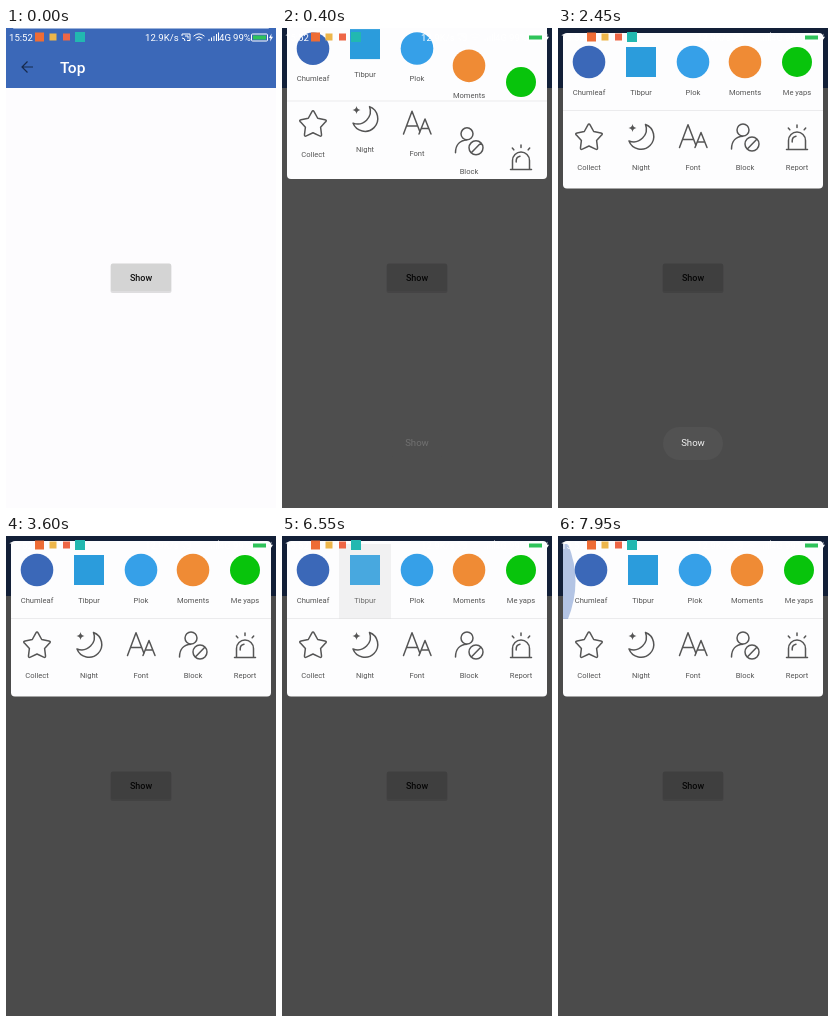
Write an HTML page that moves like this. It is 270 by 480 pixels and loops after 8000 ms.

```html
<!DOCTYPE html>
<html lang="en">
<head>
<meta charset="utf-8">
<style>
  html, body { margin: 0; width: 100%; height: 100%; overflow: hidden; }
  svg { display: block; width: 100vw; height: 100vh; font-family: Roboto, sans-serif; }
  .label { font-size: 7.6px; fill: #555; text-anchor: middle; }
  .line { fill: none; stroke: #555; stroke-width: 1.5; stroke-linecap: round; stroke-linejoin: round; }
  .status { font-size: 9.6px; fill: #fff; }
  .thin { fill: none; stroke: #fff; stroke-width: 1; }
</style>
</head>
<body>
<svg viewBox="0 0 270 480">
  <defs>
    <clipPath id="clipTop"><rect x="5" y="5" width="260" height="78"/></clipPath>
    <clipPath id="clipBottom"><rect x="5" y="84" width="260" height="74"/></clipPath>
  </defs>

  <rect width="270" height="480" fill="#fdfcfe"/>
  <rect width="270" height="60" fill="#3b68b8"/>
  <path d="M27 39H16M21.5 33.5L16 39L21.5 44.5" fill="none" stroke="#172a4d" stroke-width="1.2"/>
  <text x="54" y="45" font-size="15.5" font-weight="500" fill="#fff">Top</text>
  <rect x="104.5" y="236" width="61" height="29" rx="2" fill="#000" opacity=".12"/>
  <rect x="105" y="235.5" width="60" height="27.5" rx="1.5" fill="#d4d4d4"/>
  <text x="135" y="252.8" font-size="9" font-weight="500" fill="#111" text-anchor="middle">Show</text>

  <rect id="dim" width="270" height="480"/>

  <g id="sheet">
    <rect x="5" y="5" width="260" height="155.5" rx="4" fill="#fdfdfe"/>
    <path d="M5 82.5H265" stroke="#ebebed"/>
    <g clip-path="url(#clipTop)">
      <g id="topRow"></g>
      <path id="glow" fill="#3b68b8"/>
    </g>
    <g clip-path="url(#clipBottom)" id="bottomRow"></g>
  </g>

  <g id="toast">
    <rect x="105" y="399" width="60" height="33" rx="16.5" fill="#525252"/>
    <text x="135" y="418.3" font-size="9.6" fill="#f2f2f2" text-anchor="middle">Show</text>
  </g>

  <g class="status">
    <text x="3" y="13">15:52</text>
    <text x="139" y="13">12.9K/s</text>
    <text x="213" y="13">4G</text>
    <text x="227" y="13">99%</text>
    <rect x="29" y="4.5" width="9" height="9" fill="#ee6c35"/>
    <rect x="43.5" y="5.5" width="7" height="7" fill="#edb64a"/>
    <rect x="57" y="5.5" width="7" height="7" fill="#ee6646"/>
    <rect x="69" y="4" width="10" height="10" fill="#22b8b0"/>
    <path class="thin" d="M176 8V6H184V12.5H181M176 10A3 3 0 0 1 179 13M179 8H182V10.5
      M187.5 8.2Q193 3.5 198.5 8.2M189.5 10.3Q193 7.3 196.5 10.3M191.4 12.2Q193 10.8 194.6 12.2
      M203 13V11M205.5 13V9.5M208 13V8M210.5 13V6M212.5 13V4.5"/>
    <rect class="thin" x="245.5" y="6" width="16" height="7" rx="1"/>
    <rect x="247" y="7.5" width="13" height="4" fill="#2fc35a"/>
    <path d="M265.5 5.5L263 10H264.6L264 13.5L267 8.7H265.2Z"/>
  </g>
</svg>

<script>
const LOOP = 8000;
const $ = id => document.getElementById(id);
const clamp = x => Math.min(1, Math.max(0, x));
const ramp = (t, start, end) => clamp((t - start) / (end - start));
const ease = x => (1 - Math.cos(Math.PI * x)) / 2;
const pulse = (t, a, b, c, d) => ramp(t, a, b) * (1 - ramp(t, c, d));

const polar = (r, a) => `${(r * Math.sin(a)).toFixed(1)} ${(1 - r * Math.cos(a)).toFixed(1)}`;

// Five rounded tips joined at the inner corners.
const star = Array.from({ length: 5 }, (_, i) => {
  const a = i * Math.PI * 0.4;
  return `${polar(12.9, a - 0.09)}Q${polar(15, a)} ${polar(12.9, a + 0.09)}L${polar(8, a + Math.PI / 5)}`;
}).join('L');

const disc = (color, r = 16.3) => `<circle r="${r}" fill="${color}"/>`;
const line = d => `<path class="line" d="${d}"/>`;

const topItems = [
  ['Chumleaf', disc('#3b68b8')],
  ['Tibpur', '<rect x="-15" y="-15" width="30" height="30" fill="#2b9cdc"/>'],
  ['Plok', disc('#36a0e8')],
  ['Moments', disc('#ef8b35')],
  ['Me yaps', disc('#08c40c', 15)],
];
const bottomItems = [
  ['Collect', line(`M${star}Z`)],
  ['Night', line('M4.5 -12.5A12.8 12.8 0 1 1 -12 4A12.8 12.8 0 0 0 4.5 -12.5Z') +
    '<path fill="#555" d="M-8.5 -13Q-8 -9.5 -4.5 -9Q-8 -8.5 -8.5 -5Q-9 -8.5 -12.5 -9Q-9 -9.5 -8.5 -13Z"/>'],
  ['Font', line('M-13.5 10.5L-5 -12.3L3 8.5M-10.5 2.5H0.5M2 10.5L8 -4.5L14 10.5M4.3 5H11.8')],
  ['Block', line('M4 -7A6 6 0 1 1 -8 -7A6 6 0 1 1 4 -7M-13.5 12C-13.5 4 -9 -0.5 -2 -0.8' +
    'M14 7A7 7 0 1 1 0 7A7 7 0 1 1 14 7M2.3 12L11.8 2.2')],
  ['Report', line('M-10.5 12.5H10.5M-8.5 12V3.5A8.5 8.5 0 0 1 8.5 3.5V12M-4.8 5V4A4.8 4.8 0 0 1 -1 -0.8' +
    'M0 -12V-9.5M-8.7 -9L-7.2 -7.2M8.7 -9L7.2 -7.2')],
];

function buildRow(parent, items, iconY, labelY) {
  parent.innerHTML = items.map(([name, icon], i) => `
    <rect x="${5 + i * 52}" y="8" width="52" height="75" fill="#ddd" opacity="0"/>
    <g class="item"><g transform="translate(${31 + i * 52} ${iconY})">${icon}</g>
    <text class="label" x="${31 + i * 52}" y="${labelY}">${name}</text></g>`).join('');
  return [...parent.querySelectorAll('.item')];
}
const topRow = buildRow($('topRow'), topItems, 34, 66.6);
const bottomRow = buildRow($('bottomRow'), bottomItems, 109, 142);

// Items spring up one after another.
function springOffset(t, i) {
  if (t >= 950) return 0;
  const s = Math.max(0, t - 110 - i * 70) / 1000;
  return 30 * Math.exp(-6 * s) * (Math.cos(15 * s) + 0.4 * Math.sin(15 * s));
}

function setPress(i, amount) {
  topRow[i].setAttribute('opacity', 1 - 0.4 * amount);
  topRow[i].previousElementSibling.setAttribute('opacity', amount);
}

function draw(t) {
  $('dim').setAttribute('opacity', 0.7 * ease(ramp(t, 50, 430)));
  $('sheet').setAttribute('transform', `translate(0 ${-160 * (1 - ease(ramp(t, 62, 464)))})`);
  for (const row of [topRow, bottomRow])
    row.forEach((item, i) => item.setAttribute('transform', `translate(0 ${springOffset(t, i)})`));

  $('toast').setAttribute('opacity', pulse(t, 350, 600, 2600, 2900));

  setPress(2, 0.75 * pulse(t, 4400, 4700, 4900, 5200));
  setPress(1, 0.75 * pulse(t, 6050, 6350, 6350, 6750));

  // Dragging past the left edge nudges the row and shows a glow.
  const pull = pulse(t, 5000, 5200, 5250, 5800) * 0.4 + ease(ramp(t, 7200, 7900));
  $('topRow').setAttribute('transform', `translate(${t > 7100 ? 2 * pull : 0} 0)`);
  $('glow').setAttribute('d', `M5 8H${5 + 5 * pull}Q${5 + 20 * pull} 45 ${5 + 5 * pull} 83H5Z`);
  $('glow').setAttribute('opacity', 0.38 * pull);
}

function frame() {
  draw(performance.now() % LOOP);
  requestAnimationFrame(frame);
}
frame();
</script>
</body>
</html>
```
